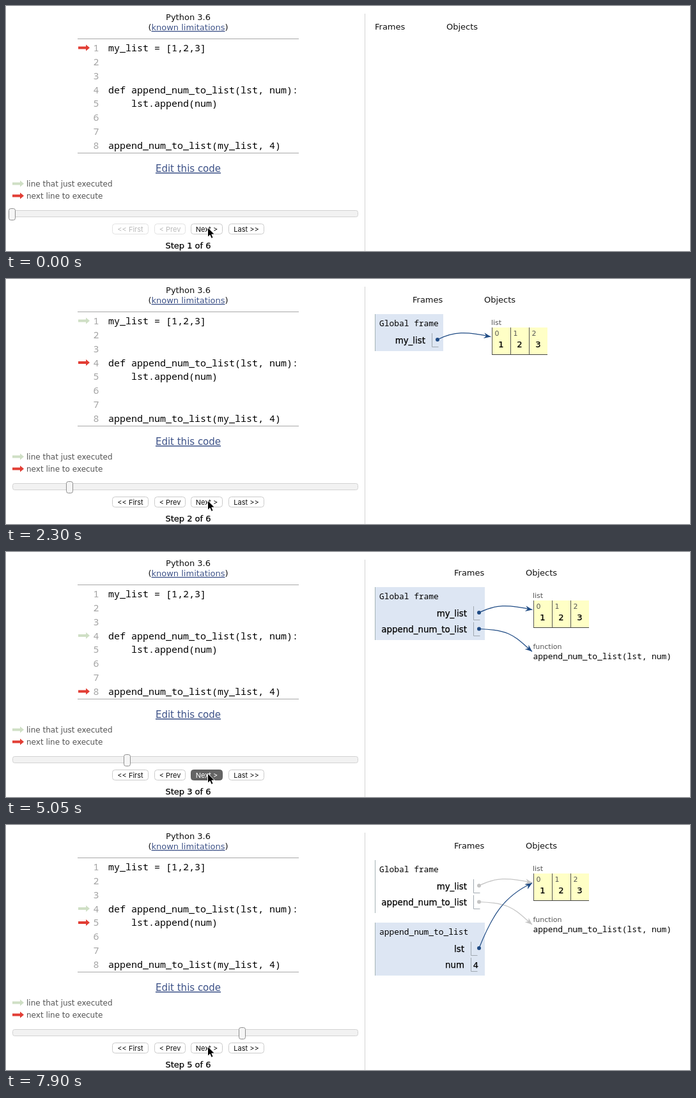
Animation of 1070x384 px, one loop 8000 ms. Source, as an HTML page:

```html
<!DOCTYPE html>
<html lang="en">
<head>
<meta charset="utf-8">
<title>Code stepper</title>
<style>
  html, body { margin: 0; width: 100%; height: 100%; overflow: hidden; background: #fff; }
  svg { display: block; }
  text { font: 13px "DejaVu Sans", sans-serif; fill: #111; white-space: pre; }
  .mid { text-anchor: middle; }
  .end { text-anchor: end; }
  .code { font: 15px "Noto Sans Mono", monospace; fill: #000; }
  .line { font: 15px "Noto Sans Mono", monospace; fill: #a3a3a3; }
  .mono { font: 12.9px "Noto Sans Mono", monospace; fill: #000; }
  .name { font-size: 13.4px; text-anchor: end; }
  .name, .strong { fill: #000; stroke: #000; stroke-width: .25px; }
  .link { fill: #3d5288; text-decoration: underline; }
  .big { font-size: 15px; text-anchor: middle; }
  .legend { font-size: 12px; fill: #555; }
  .small { font-size: 11px; fill: #555; }
  .button { font: 11px Inter, sans-serif; text-anchor: middle; }
</style>
</head>
<body>
<svg id="stage" width="1070" height="384" viewBox="0 0 1070 384"></svg>
<script>
const LOOP = 8000;
const RED = '#e23d34', GREEN = [207, 223, 197], BLUE = '#1f4b84', GREY = '#c4c4c4';

// Button press, step change, last executed line, next line
const steps = [
  { press: 0, at: 0, prev: 0, next: 1 },
  { press: 1550, at: 1650, prev: 1, next: 4 },
  { press: 2950, at: 3050, prev: 4, next: 8 },
  { press: 4950, at: 5150, prev: 8, next: 4 },
  { press: 6850, at: 6900, prev: 4, next: 5 }
];

const source = ['my_list = [1,2,3]', '', '', 'def append_num_to_list(lst, num):',
  '    lst.append(num)', '', '', 'append_num_to_list(my_list, 4)'];

const lineY = n => 65.5 + (n - 1) * 21.86;
const text = (x, y, s, cls = '') =>
  `<text x="${x}" y="${y}" class="${cls}">${s.replace(/</g, '&lt;').replace(/>/g, '&gt;')}</text>`;
const rect = (x, y, w, h, fill, extra = '') =>
  `<rect x="${x}" y="${y}" width="${w}" height="${h}" fill="${fill}" ${extra}/>`;
const path = (d, stroke, width = 1) =>
  `<path d="${d}" fill="none" stroke="${stroke}" stroke-width="${width}"/>`;
const arrow = (id, x, y, fill) =>
  `<path id="${id}" d="M0-2H12V-5L18 0L12 5V2H0Z" transform="translate(${x} ${y})" fill="${fill}"/>`;
const rgb = c => `rgb(${c.map(Math.round)})`;

function button(x, w, label, state) {
  const fill = state === 'down' ? '#646464' : '#fff';
  const border = { down: '#5c5c5c', off: '#e2e2e2' }[state] || '#cbcbcb';
  const ink = { down: '#fff', off: '#bababa' }[state] || '#111';
  return rect(x + .5, 341.5, w - 1, 16, fill, `rx="4" stroke="${border}"`) +
    text(x + w / 2, 354, label, 'button').replace('<text', `<text style="fill:${ink}"`);
}

function controls(step, down) {
  const back = step ? 'on' : 'off';
  return rect(4.5 + step * 90, 317.5, 10, 18, '#f5f5f5', 'rx="3" stroke="#8e8e8e"') +
    button(166, 57, '<< First', back) + button(232, 49, '< Prev', back) +
    button(289, 50, 'Next >', down ? 'down' : 'on') + button(348, 56, 'Last >>', 'on') +
    text(285, 380, `Step ${step + 1} of 6`, 'mid strong');
}

function frameBox(y, width, height, title, active) {
  return (active ? rect(577, y, width, height, '#dde6f3') : '') +
    path(`M577.5 ${y}v${height}`, '#a6b3b6') + text(584, y + 18.5, title, 'mono');
}

function variable(x, y, name, value = '') {
  return text(x - 10, y, name, 'name') +
    path(`M${x + .5} ${y - 16}v21.5h10`, '#a0a8b0') + text(x + 8, y, value, 'mid strong');
}

function connector(x, y, bend, endX, endY, angle, color) {
  return `<circle cx="${x}" cy="${y}" r="3" fill="${color}"/>` +
    path(`M${x} ${y}C${bend} ${endX} ${endY}`, color, 1.2) +
    `<path d="M0 0L-11-4.5L-7.5 0L-11 4.5Z" fill="${color}" transform="translate(${endX} ${endY}) rotate(${angle})"/>`;
}

function listObject(x) {
  let out = text(x - 1, 72, 'list', 'small') + rect(x, 76, 87, 42, '#ffffc6');
  for (let i = 0; i < 3; i++) {
    const left = x + i * 29;
    out += path(`M${left + .5} 76v42`, '#555') +
      text(left + 4.5, 89, String(i), 'small') + text(left + 14.5, 107, String(i + 1), 'mid strong');
  }
  return out + path(`M${x} 118.5h87`, '#444');
}

function memory(step) {
  const shift = [0, 59, 124][Math.min(step, 2)];
  let out = text(577 + shift, 37, 'Frames') + text(689 + shift, 37, 'Objects');
  if (!step) return out;

  const hasFunction = step > 1, inCall = step > 2;
  const dx = hasFunction ? 65 : 0;
  const color = inCall ? GREY : BLUE;
  out += frameBox(55, 107 + dx, hasFunction ? 83 : 58, 'Global frame', !inCall) +
    variable(666 + dx, 101, 'my_list') + listObject(760 + dx);
  if (hasFunction) {
    out += variable(731, 126, 'append_num_to_list') +
      text(824.5, 152, 'function', 'small') +
      text(824.5, 168, 'append_num_to_list(lst, num)', 'mono');
  }
  if (inCall) {
    out += frameBox(153, 172, 83, 'append_num_to_list', true) +
      variable(727, 199, 'lst') + variable(727, 224, 'num', '4');
  }
  out += connector(675 + dx, 95, `${700 + dx} 82 ${720 + dx} 82`, 758.5 + dx, 90.5, 10, color);
  if (hasFunction) out += connector(740, 120.5, '790 122 795 132', 823, 156, 41, color);
  if (inCall) out += connector(740, 193, '760 143 778 112', 823, 91, -32, BLUE);
  return out;
}

function backdrop() {
  const code = source.map((s, i) =>
    text(145.5, lineY(i + 1) + 5.5, String(i + 1), 'line end') +
    text(160, lineY(i + 1) + 5.5, s, 'code')).join('');
  return path('M561.5 12V384', '#d3d3d3') +
    text(285, 22, 'Python 3.6', 'mid') +
    '<text x="285" y="38" class="mid">(<tspan class="link">known limitations</tspan>)</text>' +
    path('M112 51.5H458M112 230.5H458', '#a8a8a8') + code +
    text(285, 260, 'Edit this code', 'link big') +
    arrow('', 10, 278.5, rgb(GREEN)) + text(32, 283, 'line that just executed', 'legend') +
    arrow('', 10, 297.5, RED) + text(32, 302, 'next line to execute', 'legend') +
    rect(10.5, 320.5, 540, 10, '#f2f2f2', 'rx="3" stroke="#d2d2d2"');
}

const stage = document.getElementById('stage');
stage.innerHTML = backdrop() + arrow('prev', 113, 0, '#fff') + arrow('next', 113, 0, RED) +
  '<g id="controls"></g><g id="memory"></g>' +
  '<path d="M315.5 347v15.2l3.5-3.3l2.4 5.4l2.7-1.1l-2.3-5.2h4.7Z" fill="#000" stroke="#fff" stroke-linejoin="round"/>';
const part = id => document.getElementById(id);
const prevArrow = part('prev'), nextArrow = part('next');

const clamp = v => Math.max(0, Math.min(1, v));
const ease = p => p < .5 ? 4 * p ** 3 : 1 - 4 * (1 - p) ** 3;
const place = (node, y) => node.setAttribute('transform', `translate(113 ${y})`);

// The old marker fades for 200 ms, then the next-line arrow slides for 250 ms
function moveArrows(index, elapsed) {
  const step = steps[index], before = steps[index - 1] || step;
  const fading = elapsed < 200;
  const shown = fading ? before.prev : step.prev;
  const fade = fading && index ? clamp(elapsed / 200) : 0;
  prevArrow.setAttribute('visibility', shown ? 'visible' : 'hidden');
  prevArrow.setAttribute('fill', rgb(GREEN.map(c => c + (255 - c) * fade)));
  place(prevArrow, lineY(shown || 1));
  const slide = ease(clamp((elapsed - 200) / 250));
  place(nextArrow, lineY(before.next) + (lineY(step.next) - lineY(before.next)) * slide);
}

let shownStep = -1, shownDown = false;
function render(t) {
  let index = steps.length - 1;
  while (steps[index].at > t) index--;
  const down = steps.some(s => t >= s.press && t < s.at);
  if (index !== shownStep) part('memory').innerHTML = memory(index);
  if (index !== shownStep || down !== shownDown) part('controls').innerHTML = controls(index, down);
  shownStep = index;
  shownDown = down;
  moveArrows(index, t - steps[index].at);
}

const start = performance.now();
function tick() {
  render((performance.now() - start) % LOOP);
  requestAnimationFrame(tick);
}
tick();
</script>
</body>
</html>
```
